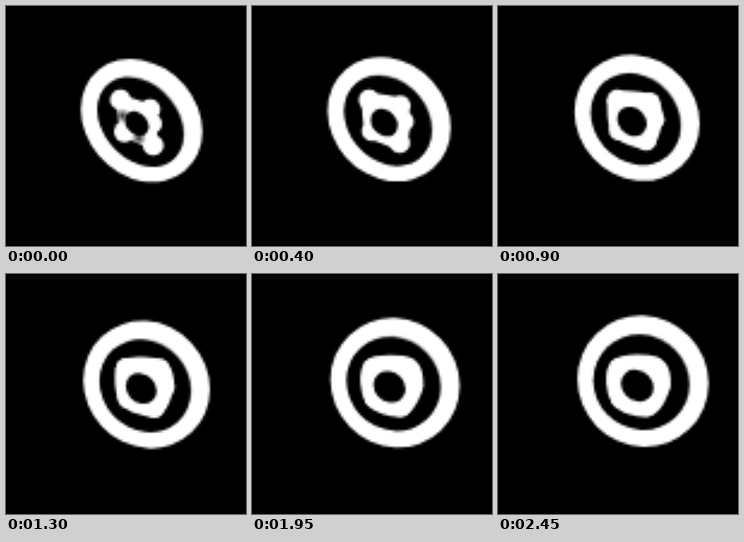
An HTML page with a canvas for the animation above (2.5 s loop, 300 px wide and 300 px high).

```html
<!DOCTYPE html>
<html>
<head>
<meta charset="utf-8">
<style>
html, body { margin: 0; width: 100%; height: 100%; overflow: hidden; background: #000; }
canvas { display: block; width: 300px; height: 300px; }
</style>
</head>
<body>
<canvas id="stage" width="100" height="100"></canvas>
<script>
const ctx = document.getElementById('stage').getContext('2d');
const LOOP = 2500, STEP = 50, LOBE = 13;

const mix = (a, b, p) => a + (b - a) * p;
const settle = (t, tau) => 1 - Math.exp(-t / tau);

// Ellipse whose top leans left by skew / h and whose right side drops by skew / w
function oval(x, y, w, h, skew, color) {
  const k = skew / w;
  ctx.save();
  ctx.transform(w, k, 0, Math.sqrt(h * h - k * k), x, y);
  ctx.beginPath();
  ctx.arc(0, 0, 1, 0, 2 * Math.PI);
  ctx.restore();
  ctx.fillStyle = color;
  ctx.fill();
}

// Closed path through the points; bend 0 is straight, 1 is a Catmull-Rom curve
function loopPath(points, bend) {
  const n = points.length, s = bend / 6;
  const at = i => points[(i + n) % n];
  ctx.beginPath();
  ctx.moveTo(...points[0]);
  for (let i = 0; i < n; i++) {
    const [a, b, c, d] = [at(i - 1), at(i), at(i + 1), at(i + 2)];
    ctx.bezierCurveTo(
      b[0] + (c[0] - a[0]) * s, b[1] + (c[1] - a[1]) * s,
      c[0] - (d[0] - b[0]) * s, c[1] - (d[1] - b[1]) * s, ...c);
  }
  ctx.closePath();
}

// Soft dark spot halfway between two lobes
function shade(a, b, alpha) {
  const x = mix(a[0], b[0], 0.5), y = mix(a[1], b[1], 0.5), r = 10;
  const g = ctx.createRadialGradient(x, y, 0, x, y, r);
  g.addColorStop(0, `rgba(0,0,0,${alpha})`);
  g.addColorStop(1, 'rgba(0,0,0,0)');
  ctx.fillStyle = g;
  ctx.fillRect(x - r, y - r, 2 * r, 2 * r);
}

function drawRing(p, lean) {
  oval(mix(169.5, 181.2, p), mix(143, 134, p), mix(76, 82, p), mix(77, 82, p), 1050 * lean, '#fff');
  const x = mix(168, 179, p), y = mix(145, 135.5, p), w = mix(54, 60, p), h = mix(56, 59.5, p);
  oval(x + 1.2, y - 1.2, w, h, 850 * lean, '#aaa');
  oval(x, y, w, h, 850 * lean, '#000');
}

// Five lobes joined by links that thicken and round out
function drawCore(t, p) {
  const e = settle(t, 1000);
  const lobe = (x0, y0, x1, y1) => [mix(x0, x1, e), mix(y0, y1, e)];
  const topLeft = lobe(143, 117, 153, 118);
  const bottomRight = lobe(184, 174, 186, 164);
  const bottomLeft = lobe(148, 157, 154, 154);
  const lobes = [topLeft, lobe(180, 129, 196, 115), lobe(182, 147, 204, 138), bottomRight, bottomLeft];

  ctx.fillStyle = ctx.strokeStyle = '#fff';
  ctx.lineJoin = 'round';
  ctx.lineWidth = 2 * mix(6, 14, e);
  loopPath(lobes, e);
  ctx.fill();
  ctx.stroke();
  for (const [x, y] of lobes) {
    ctx.beginPath();
    ctx.arc(x, y, LOBE, 0, 2 * Math.PI);
    ctx.fill();
  }

  oval(mix(163.5, 174, p), mix(147, 139.5, p), mix(15, 21, e), mix(15.5, 20.5, e), 60, '#000');
  const fade = 0.8 * Math.max(0, 1 - t / 400);
  shade(topLeft, bottomLeft, fade);
  shade(bottomLeft, bottomRight, fade);
}

function draw(t) {
  const p = t / (LOOP - STEP);
  ctx.setTransform(1, 0, 0, 1, 0, 0);
  ctx.fillStyle = '#000';
  ctx.fillRect(0, 0, 100, 100);
  ctx.scale(1 / 3, 1 / 3);
  drawRing(p, 1 - settle(t, 1500));
  drawCore(t, p);
}

function tick() {
  draw(Math.floor(performance.now() % LOOP / STEP) * STEP);
  requestAnimationFrame(tick);
}
tick();
</script>
</body>
</html>
```
